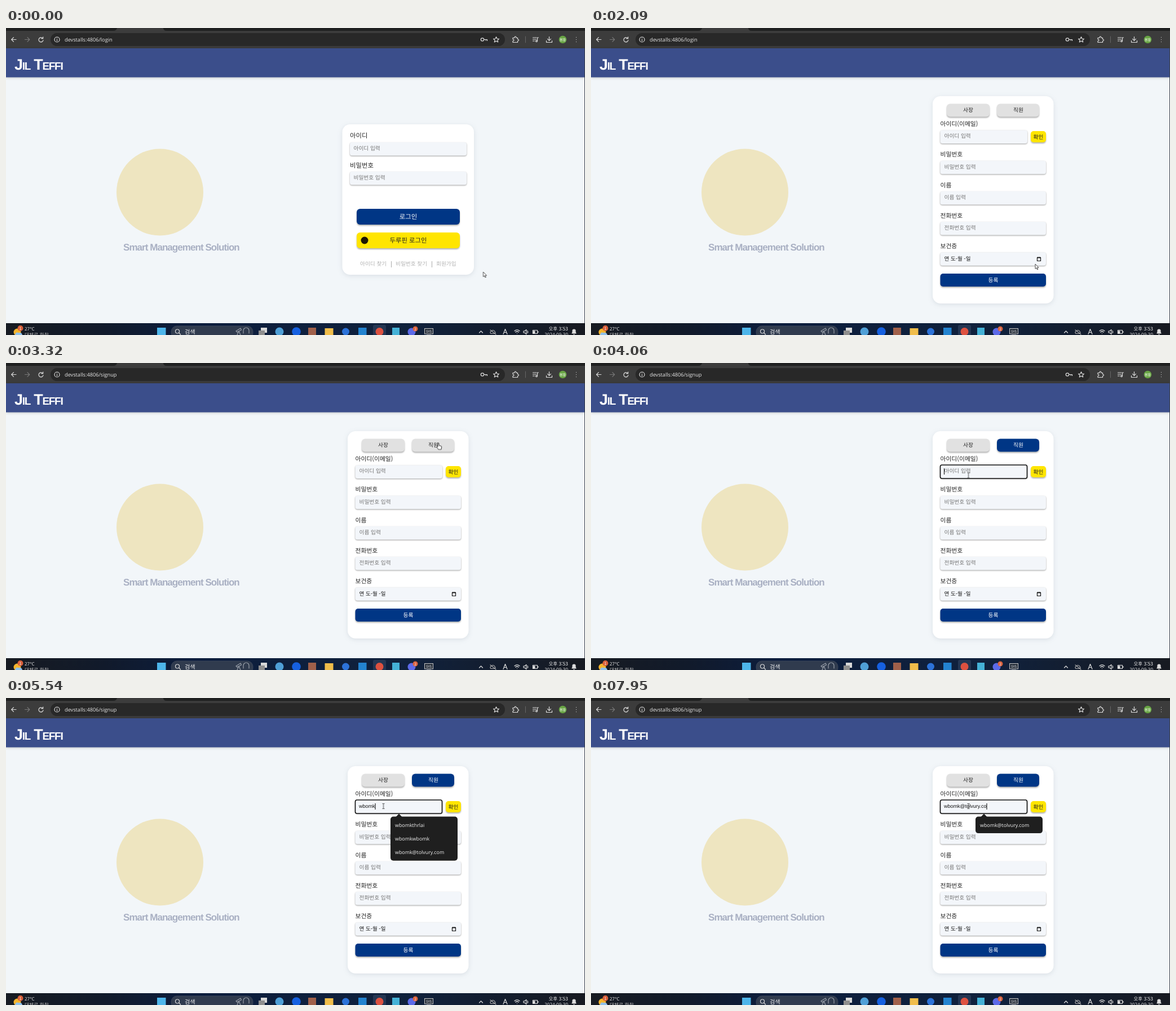
Recreate the animation shown at these times as an HTML page. Size 1027 by 545 pixels, loop 8000 ms.

```html
<!DOCTYPE html>
<html lang="ko">
<head>
<meta charset="utf-8">
<title>Sign up</title>
<style>
html, body { margin: 0; width: 100%; height: 100%; overflow: hidden; background: #f2f6f9; }
svg { display: block; width: 1027px; height: 545px; }
text { font-family: "Noto Sans CJK KR", "Noto Sans CJK", "Open Sans", sans-serif; text-rendering: geometricPrecision; white-space: pre; }
.latin text, text.latin { font-family: "Open Sans", "Noto Sans", sans-serif; }
.mid { text-anchor: middle; }
.brand { font: bold 27px "Liberation Sans", sans-serif; font-variant: small-caps; letter-spacing: -1.3px; fill: #fff; }
.slogan { font: bold 17px "Liberation Sans", sans-serif; letter-spacing: -.95px; fill: #a9b0c3; }
.url { font-size: 9.2px; fill: #e6e6e6; }
.line { fill: none; stroke: #dcdcdc; stroke-width: 1.2; stroke-linecap: round; stroke-linejoin: round; }
.card { fill: #fff; filter: drop-shadow(0 2px 4px rgba(60, 80, 100, .13)); }
.box { fill: #f3f6fa; filter: drop-shadow(0 1.5px 1px rgba(0, 0, 0, .38)); }
.btn { filter: drop-shadow(0 2px 1.2px rgba(0, 0, 0, .3)); }
.navy { fill: #003685; }
.gray { fill: #e1e1e1; }
.yellow { fill: #ffe500; }
.label { font-size: 11.4px; fill: #222; }
.small { font-size: 10.8px; }
.hint { font-size: 9.7px; fill: #777; }
.link { font-size: 9.7px; fill: #b3b3b3; }
.cap { font-size: 9.7px; text-anchor: middle; fill: #222; }
.white { fill: #fff; }
.typed { font: 9px "Liberation Sans", sans-serif; fill: #111; }
#menu text { font-size: 8.9px; fill: #f2f2f2; }
.bar text { font-size: 8px; fill: #f0f0f0; }

/* Hard switches and pointer positions over the 8 s loop */
.a { animation: 8s step-end infinite; }
#login { animation-name: login; }
#signup { animation-name: signup; }
.urlIn { animation-name: urlIn; }
.urlUp { animation-name: urlUp; }
#key { animation-name: key; }
#staff { animation-name: staff; }
#staffCap { animation-name: staffCap; }
#focus { animation-name: focus; }
#pointer { animation-name: move; }
#arrow { animation-name: arrow; }
#hand { animation-name: hand; }
#beam { animation-name: beam; }
@keyframes login { 0% { visibility: visible } 24.375%, 100% { visibility: hidden } }
@keyframes signup { 0% { visibility: hidden } 24.375%, 100% { visibility: visible } }
@keyframes urlIn { 0% { visibility: visible } 27.875%, 100% { visibility: hidden } }
@keyframes urlUp { 0% { visibility: hidden } 27.875%, 100% { visibility: visible } }
@keyframes key { 0% { visibility: visible } 61.625%, 100% { visibility: hidden } }
@keyframes staff { 0% { fill: #e1e1e1 } 44%, 100% { fill: #003685 } }
@keyframes staffCap { 0% { fill: #222 } 44%, 100% { fill: #fff } }
@keyframes focus { 0% { opacity: 0 } 50.75%, 100% { opacity: 1 } }
@keyframes arrow {
  0% { visibility: visible } 21.75% { visibility: hidden }
  25.25% { visibility: visible } 40.625%, 100% { visibility: hidden }
}
@keyframes hand {
  0% { visibility: hidden } 21.75% { visibility: visible }
  25.25% { visibility: hidden } 40.625% { visibility: visible }
  45.75%, 100% { visibility: hidden }
}
@keyframes beam { 0% { visibility: hidden } 45.75%, 100% { visibility: visible } }
@keyframes move {
  0% { transform: translate(846.5px, 433px) }
  .875% { transform: translate(845.5px, 433px) }
  1.625% { transform: translate(846.5px, 433px) }
  8.25% { transform: translate(843px, 433px) }
  9.125% { transform: translate(836px, 433px) }
  10% { transform: translate(828px, 433px) }
  10.875% { transform: translate(820px, 433px) }
  11.625% { transform: translate(816px, 433px) }
  18.25% { transform: translate(808.5px, 433px) }
  19.125% { transform: translate(806px, 432px) }
  20% { transform: translate(800px, 428px) }
  20.875% { transform: translate(792px, 424px) }
  21.75% { transform: translate(785px, 419px) }
  22.625% { transform: translate(782px, 418px) }
  25.25% { transform: translate(784px, 418px) }
  26.125% { transform: translate(788px, 419px) }
  27% { transform: translate(791px, 420px) }
  29.5% { transform: translate(799.5px, 419.5px) }
  33.625% { transform: translate(799px, 412px) }
  34.5% { transform: translate(797px, 390px) }
  35.375% { transform: translate(794px, 350px) }
  36.25% { transform: translate(789px, 300px) }
  37.125% { transform: translate(783px, 249px) }
  38% { transform: translate(777px, 207px) }
  38.875% { transform: translate(772px, 178px) }
  39.75% { transform: translate(769px, 160px) }
  40.625% { transform: translate(767px, 146px) }
  41.5% { transform: translate(767px, 141.5px) }
  44.875% { transform: translate(752px, 150px) }
  45.75% { transform: translate(716px, 174px) }
  46.625% { transform: translate(684px, 192px) }
  48.25% { transform: translate(669.5px, 199.5px) }
  54.125%, 100% { transform: translate(669.5px, 192px) }
}
</style>
</head>
<body>
<svg viewBox="0 0 1027 545" xmlns="http://www.w3.org/2000/svg">
  <defs>
    <linearGradient id="bar">
      <stop offset="0" stop-color="#171b22"/>
      <stop offset=".17" stop-color="#111a2b"/>
      <stop offset=".32" stop-color="#0c1d3d"/>
      <stop offset=".7" stop-color="#10213c"/>
      <stop offset="1" stop-color="#171a21"/>
    </linearGradient>
  </defs>

  <!-- browser -->
  <rect width="1027" height="36" fill="#3c3c3c"/>
  <path d="M0 0H197Q196 5 190 5H0ZM279 0H1027V5H285Q279 5 279 0Z" fill="#1f2020"/>
  <rect x="79" y="9" width="806" height="23" rx="11.5" fill="#282828"/>
  <g class="line">
    <path d="M18 20.500H10M13.500 16.700L9.700 20.500L13.500 24.300"/>
    <path d="M33.500 20.500H41.500M38 16.700L41.800 20.500L38 24.300" stroke="#777"/>
    <path d="M65 18.200A4 4 0 1 0 66 21.500M65.700 15.800V18.700H62.800"/>
    <circle cx="90.500" cy="20.500" r="4.500"/>
    <path d="M90.500 20.300V22.800M90.500 18.100V18.200"/>
    <g id="key" class="a"><circle cx="845" cy="20.500" r="2.700"/><path d="M848 20.500H853.500V22.500M851 20.500V22"/></g>
    <path d="M869.500 15.700L871 19L874.500 19.300L871.900 21.600L872.700 25L869.500 23.200L866.300 25L867.100 21.600L864.500 19.300L868 19Z"/>
    <path d="M899 17.500H902Q902 15 903.500 15T905 17.500H907.500V20Q909.500 20 909.500 21.500T907.500 23V25.500H899V23Q901 23 901 21.500T899 20Z"/>
    <path d="M921.500 15V26" stroke="#666" stroke-width="1"/>
    <path d="M934.500 17H941M934.500 20H940M934.500 23H937.500M942.500 23V17H944.500"/><circle cx="941" cy="23.300" r="1.400"/>
    <path d="M963.500 15.500V22M960.500 19.300L963.500 22.300L966.500 19.300M958.500 22.500V25.500H968.500V22.500"/>
  </g>
  <g class="latin">
    <text class="url a urlIn" x="104" y="23.900">devstalls:4806/login</text>
    <text class="url a urlUp" x="104" y="23.900">devstalls:4806/signup</text>
  </g>
  <circle cx="987.500" cy="20.500" r="6.800" fill="#68a544"/>
  <text class="mid white" x="987.500" y="22.700" font-size="6">봄들</text>
  <path d="M1011.500 16.500V16.600M1011.500 20.500V20.600M1011.500 24.500V24.600" class="line" stroke-width="2"/>

  <!-- page -->
  <rect y="36" width="1027" height="488" fill="#f2f6f9"/>
  <rect y="36" width="1027" height="51.500" fill="#3b4e8b" style="filter: drop-shadow(0 1px 2px rgba(0,0,0,.2))"/>
  <text class="brand" x="15" y="73.500">Jil Teffi</text>
  <circle cx="273" cy="291.500" r="77" fill="#eee5c0"/>
  <text class="slogan" x="208" y="394.500">Smart Management Solution</text>

  <g id="login" class="a">
    <rect class="card" x="596.500" y="171" width="233.500" height="267" rx="14"/>
    <text class="label" x="610" y="195.300">아이디</text>
    <rect class="box" x="610" y="203" width="207" height="23.500" rx="4"/>
    <text class="hint" x="616.500" y="217.300">아이디 입력</text>
    <text class="label" x="610" y="247.500">비밀번호</text>
    <rect class="box" x="610" y="255" width="207" height="23.500" rx="4"/>
    <text class="hint" x="616.500" y="269.300">비밀번호 입력</text>
    <rect class="btn navy" x="622" y="321" width="183" height="28" rx="6"/>
    <text class="label mid white" x="713.500" y="339" style="fill:#fff">로그인</text>
    <rect class="btn yellow" x="622" y="363" width="183" height="28" rx="6"/>
    <circle cx="636" cy="377" r="6.500" fill="#1c1600"/>
    <text class="label mid" x="713.500" y="380.800" font-weight="500">두루핀 로그인</text>
    <text class="link" x="628" y="421.500">아이디 찾기</text>
    <text class="link" x="691" y="421.500">비밀번호 찾기</text>
    <text class="link" x="763" y="421.500">회원가입</text>
    <path d="M683.500 414V425M755.500 414V425" stroke="#aaa"/>
  </g>

  <g id="signup" class="a">
    <rect class="card" x="606" y="121" width="214.500" height="368" rx="14"/>
    <rect class="btn gray" x="631" y="134.500" width="76" height="23" rx="6"/>
    <text class="cap" x="669" y="149.200">사장</text>
    <rect id="staff" class="btn gray a" x="720" y="134.500" width="75" height="23" rx="6"/>
    <text id="staffCap" class="cap a" x="758" y="149.200">직원</text>
    <g id="fields"></g>
    <rect class="btn yellow" x="780" y="183" width="27" height="20" rx="5"/>
    <text class="cap" x="793.500" y="196.500">확인</text>
    <text class="typed" x="626.500" y="413" style="font: 9.500px 'Noto Sans CJK KR', sans-serif">연 도-월 -일</text>
    <path d="M791.500 407.500H797.500V413.500H791.500ZM791 408H798M793 406V407M796 406V407" fill="none" stroke="#111" stroke-width="1.200"/>
    <rect class="btn navy" x="619.500" y="436" width="187.500" height="23" rx="5"/>
    <text class="cap" x="713.500" y="451" style="fill:#fff">등록</text>

    <text id="hint" class="hint" x="626.500" y="195.300">아이디 입력</text>
    <g id="focus" class="a">
      <rect x="619.500" y="181" width="154" height="24" rx="3" fill="none" stroke="#101010" stroke-width="1.600"/>
      <rect id="caret" y="187" width="1" height="11"/>
      <g id="menu" class="latin">
        <path d="M691 211.500L697 205.500L703 211.500Z" fill="#1f1f1f"/>
        <rect id="panel" x="682" y="210.500" width="119" rx="5" fill="#1f1f1f"/>
        <g id="rows"></g>
      </g>
    </g>
    <text id="typed" class="typed" x="626" y="195.300"></text>
  </g>
  <path d="M1026.500 36V524" stroke="#3a3f4a"/>

  <!-- taskbar -->
  <g class="bar">
    <rect y="524" width="1027" height="21" fill="url(#bar)"/>
    <circle cx="20" cy="540" r="6.500" fill="#f5b52e"/>
    <path d="M16 545Q17 539 22 541Q28 540 29 545Z" fill="#8fc0ea"/>
    <circle cx="25.500" cy="533" r="5" fill="#d9603b"/>
    <text class="mid" x="25.500" y="535.800" style="font-size:7px">1</text>
    <text class="latin" x="33" y="537">27°C</text>
    <text x="33" y="547.500" style="fill:#bbb;font-size:8.800px">대체로 화창</text>
    <rect x="268" y="532" width="15.500" height="15" fill="#4db5ea"/>
    <rect x="293" y="529" width="145" height="22" rx="10" fill="#303b4e" stroke="#485266" stroke-width=".6"/>
    <circle cx="304" cy="538.500" r="3.500" class="line"/>
    <path d="M306.700 541.200L309.500 544" class="line"/>
    <text x="317" y="542.700" style="font-size:10.200px">검색</text>
    <g class="line" stroke="#9aa0aa">
      <path d="M408 538L416 533L417.500 536L410 540ZM413 538L410 545M413 538L416 545" stroke="#9aa0aa"/>
      <path d="M421 542V537A5 5 0 0 1 431 537V542" stroke="#9aa0aa"/>
    </g>
    <rect x="452" y="532" width="11" height="9" fill="#d8d8d8"/><rect x="448" y="537" width="11" height="9" fill="#8e8e8e"/>
    <circle cx="485" cy="539" r="7.500" fill="#4f9fd6"/>
    <circle cx="515" cy="539" r="7.800" fill="#1660e0"/>
    <rect x="536" y="532" width="14" height="14" fill="#a0604a"/>
    <rect x="565.500" y="533" width="15" height="13" fill="#f0bd4a"/>
    <circle cx="602.500" cy="539" r="6.500" fill="#2c72d8"/>
    <rect x="625" y="532" width="14.500" height="14" fill="#2383cf"/>
    <rect x="651" y="527" width="23" height="20" rx="3" fill="#243653"/>
    <circle cx="662.500" cy="539" r="7" fill="#dd5140"/>
    <rect x="685" y="532" width="13" height="14" fill="#45b1d6"/>
    <circle cx="719.500" cy="539.500" r="7" fill="#5c6ae8"/>
    <circle cx="726" cy="534" r="4.500" fill="#d9603b"/>
    <text class="mid" x="726" y="536.500" style="font-size:6.500px">2</text>
    <rect x="742.500" y="533.500" width="15" height="9.500" fill="#28303c" stroke="#c5c5c5"/>
    <path d="M746 545H754" stroke="#c5c5c5"/>
    <text class="mid" x="750" y="540.500" style="font-size:6px">SYS</text>
    <g class="line">
      <path d="M839.500 541L842.500 538L845.500 541"/>
      <path d="M860 542.500A2.500 2.500 0 0 1 861 538A3.500 3.500 0 0 1 867 539A2 2 0 0 1 867 542.500ZM859 536L869 544" stroke="#aaa"/>
      <path d="M882 543.500L885.500 534.500L889 543.500M883.200 540.500H887.800"/>
      <path d="M902 537.800Q906.500 533.800 911 537.800M903.800 540Q906.500 537.500 909.200 540M906.500 542.500V542.600"/>
      <path d="M918 538V541H920L923 543.500V535.500L920 538ZM925 537.500Q926.500 539.500 925 541.500"/>
      <path d="M934.500 536.500H942.500V542.500H934.500ZM944 538.500V540.500"/>
      <path d="M935.500 538H938V541.500H935.500Z" fill="#ddd"/>
      <path d="M1004 542H1011L1010 540V537.500A2.500 2.500 0 0 0 1005 537.500V540ZM1006.500 544H1008.500" fill="#ddd"/>
    </g>
    <text x="997" y="537" text-anchor="end" style="font-size:8.500px">오후 3:53</text>
    <text class="latin" x="997" y="547" text-anchor="end">2024-09-30</text>
  </g>

  <!-- mouse pointer, hot spot at 0,0 -->
  <g id="pointer" class="a">
    <path id="arrow" class="a" d="M0 0V8.500L2 6.800L3.500 10L4.800 9.400L3.400 6.300H6Z" fill="#fff" stroke="#222" stroke-width=".8"/>
    <path id="hand" class="a" d="M-1 1Q0 -.5 1 1V5L5 6Q6 6.500 5.700 8L5 12H0L-3.500 7.500Q-3.500 6 -1 7.500Z" fill="#fff" stroke="#222" stroke-width=".9"/>
    <path id="beam" class="a" d="M-2 -4.500H-.5L0 -4L.5 -4.500H2M0 -4V4M-2 4.500H-.5L0 4L.5 4.500H2" fill="none" stroke="#333" stroke-width=".9"/>
  </g>
</svg>
<script>
const LOOP = 8000, FOCUS = 4060, OPEN = 4130, BLINK = 4600;
const entry = "wbomk@tolvury.co";
const keyTimes = [4930, 5260, 5400, 5470, 5540, 5810, 6270, 6490, 6690, 6890, 7090, 7290, 7420, 7620, 7820, 7950];
const options = ["wbomkthrlai", "wmnmo", "wbomkwbomk", "wbomk@tolvury.com", "selnuri", "okdam"];
const fields = [["아이디(이메일)", ""], ["비밀번호", "비밀번호 입력"], ["이름", "이름 입력"], ["전화번호", "전화번호 입력"], ["보건증", ""]];
const $ = id => document.getElementById(id);

$("fields").innerHTML = fields.map(([label, hint], i) => {
  const y = 181.5 + i * 54.2;
  return `<text class="label small" x="619.5" y="${y - 7.3}">${label}</text>
    <rect class="box" x="619.5" y="${y}" width="${i ? 187.5 : 154.5}" height="23.5" rx="4"/>
    <text class="hint" x="626.5" y="${y + 14}">${hint}</text>`;
}).join("");

function showEntry(text) {
  $("typed").textContent = text;
  $("hint").style.display = text ? "none" : "";
  $("caret").setAttribute("x", 626 + (text ? $("typed").getComputedTextLength() : 0));
  const found = options.filter(o => o.startsWith(text));
  $("panel").setAttribute("height", 5.3 + 24.3 * found.length);
  $("rows").innerHTML = found.map((o, i) => `<text x="690" y="${229 + i * 24.1}">${o}</text>`).join("");
}

let start, shown;
function render(now) {
  start ??= now;
  const t = (now - start) % LOOP;
  const text = entry.slice(0, keyTimes.filter(k => k <= t).length);
  if (text !== shown) showEntry(shown = text);
  $("menu").style.display = t < OPEN ? "none" : "";
  $("caret").style.display = t < FOCUS || (t >= BLINK && !text) ? "none" : "";
  requestAnimationFrame(render);
}
requestAnimationFrame(render);
</script>
</body>
</html>
```
